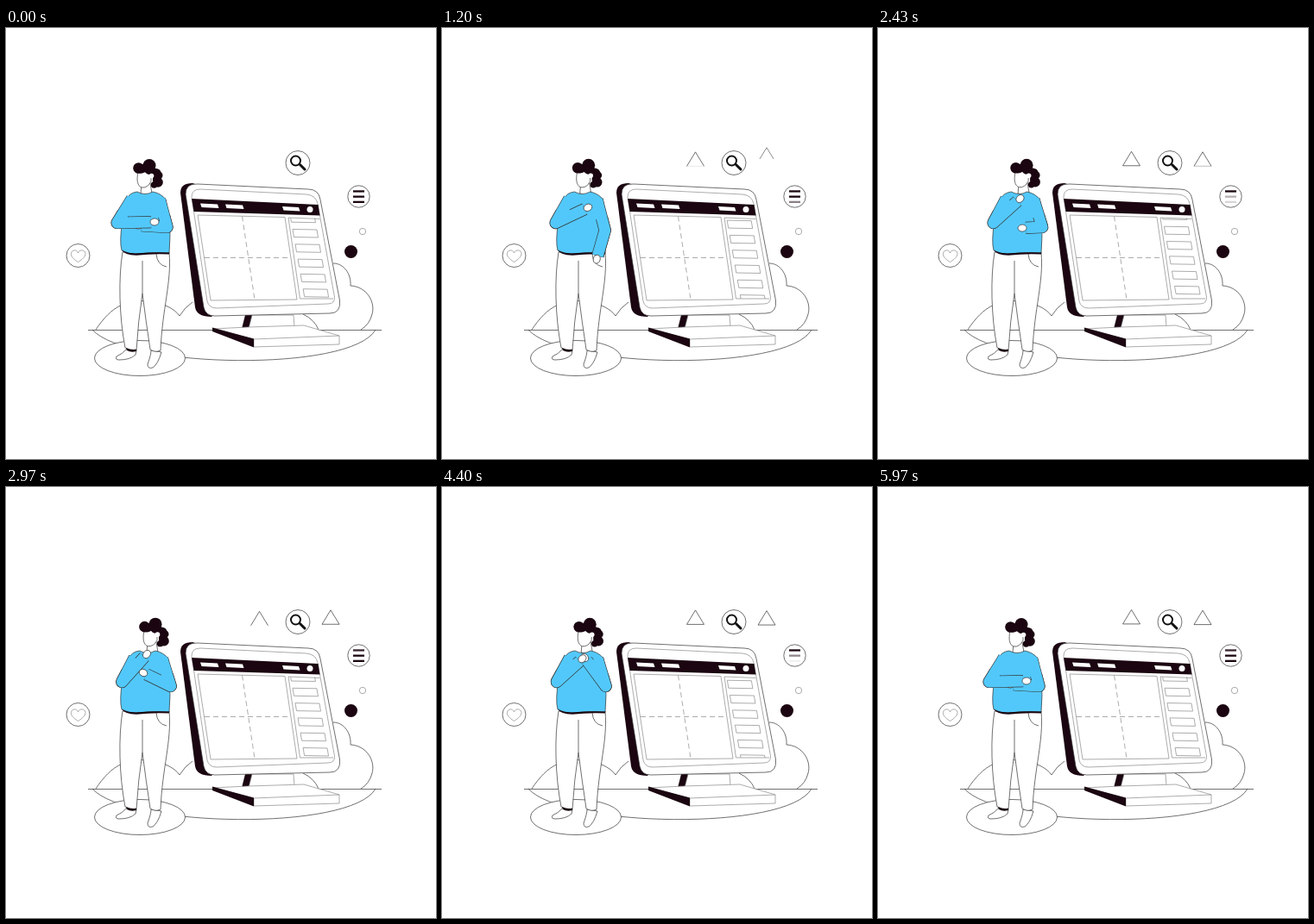
An HTML page that plays this animation: 498 px wide and 500 px high, repeating every 6010 ms.

```html
<!DOCTYPE html>
<html>
<head>
<meta charset="utf-8">
<style>
html, body { margin: 0; width: 100%; height: 100%; overflow: hidden; background: #fff; }
svg { display: block; width: 498px; height: 500px; }
.line { fill: none; stroke: #333; stroke-width: .7; }
.thin { stroke: #888; }
.white { fill: #fff; }
.dark { fill: #1a0510; }
.blue { fill: #52c8fa; }
.dash { stroke-dasharray: 6 4; }
.edge, .sleeve { fill: none; stroke: #333; stroke-width: 14.2; stroke-linejoin: round; }
.sleeve { stroke: #52c8fa; stroke-width: 12.9; }
</style>
</head>
<body>
<svg viewBox="0 0 498 500">
  <defs>
    <clipPath id="panel"><path d="M326 220.5H390V314H326Z"/></clipPath>
    <g id="arm"><path class="edge"/><path class="sleeve"/><ellipse class="line white" rx="5" ry="4"/></g>
  </defs>

  <!-- clouds and ground -->
  <g class="line">
    <path d="M104 350C112 338 122 326 135 321Q150 315 162 317C180 318 195 325 201 334Q207 324 216 318"/>
    <path d="M379 273C391 273 400 285 399 299C418 300 428 318 424 332Q421 344 411 350M344 332Q357 338 362 350"/>
    <path d="M100 350C140 395 400 400 428 350M95 350.5H435"/>
    <ellipse class="white" cx="155" cy="383" rx="52.5" ry="20.5"/>
  </g>

  <!-- monitor -->
  <path class="dark" d="M277 333H286L281 349H273Z"/>
  <path class="line white thin" d="M285 333H333L334 347L281 349Z"/>
  <path class="line white thin" d="M239 349L280 347L345 345L386 357V367L287 370V361Z"/>
  <path class="line thin" d="M287 361L386 357"/>
  <path class="dark" d="M239 347.5L287 360.5V370.5L239 352Z"/>
  <path class="dark" d="M216 180Q202 180 202 191L219 324Q221 335 238 335L250 320L222 182Z"/>
  <path class="line white" d="M222 181L350 187Q362 187 364 199L386.5 316Q388 331 375 331L242 334Q231 334 229 324L208 193Q208 180 222 181Z"/>
  <path class="line thin" d="M225 187L348 193Q359 194 361 204L380.5 312Q381 320 373 320L244 325Q235 325 233 317L215 196Q215 187 225 187Z"/>
  <path class="dark" d="M215 198L361.5 205L363.5 217.5L217.5 213Z"/>
  <path class="white" d="M225 203.5l20 1l1.5 4.5l-20 -1ZM254 204.5l20 1l1.5 4.5l-20 -1ZM320 207l19 1l1.5 4.5l-19 -1Z"/>
  <circle class="white" cx="352" cy="210.5" r="3.5"/>
  <g class="line thin">
    <path d="M222 217L323 219.5L337 315L237 316Z"/>
    <path class="dash" d="M273.5 218.5L288 315M230 266.5H330"/>
    <path d="M379 314H340.5L327 220L363.5 221.5"/>
  </g>
  <g clip-path="url(#panel)"><path id="items" class="line thin"/></g>

  <!-- floating icons -->
  <g class="line">
    <circle cx="83.5" cy="264" r="13.5"/>
    <path class="thin" d="M83.5 271.5C78 268 75 265 75.5 261.5C76 257 82 256.5 83.5 261C85 256.5 91.5 257 92 261.5C92 265 89 268 83.5 271.5Z"/>
    <circle cx="338" cy="156.5" r="14"/>
    <circle cx="408.5" cy="195.5" r="12.7"/>
    <circle class="thin" cx="413" cy="236" r="3.7"/>
  </g>
  <circle class="dark" cx="399.5" cy="259.5" r="7.5"/>
  <g fill="none" stroke="#111" stroke-linecap="round">
    <circle cx="335.5" cy="154" r="5.5" stroke-width="2"/>
    <path d="M340.5 158.5L346 164" stroke-width="3"/>
  </g>
  <path class="bar dark" d="M402 200.7h13v2.3h-13Z"/>
  <path class="bar dark" d="M402 194.5h13v2.3h-13Z"/>
  <path class="bar dark" d="M402 188.3h13v2.3h-13Z"/>
  <g class="line tri"><path d="M-10 16.5L0 0L10 16.5"/><path d="M-10 16.5H10"/></g>
  <g class="line tri"><path d="M-10 16.5L0 0L10 16.5"/><path d="M-10 16.5H10"/></g>

  <!-- legs -->
  <g class="line white">
    <path d="M139 373Q135 378 128 381Q126 385 131 385Q144 385 150 379L151 374Z"/>
    <path d="M168 374Q168 379 164 390Q164 396 170 394Q176 390 180 376Z"/>
    <path d="M135 260C130 290 131 335 138 371Q144 375 151 374Q153 340 158 308Q162 340 167 373Q173 377 179 374C181 325 192 295 189 260Z"/>
    <path d="M158 308V270M174 262Q175 275 186 277"/>
  </g>
  <path class="dark" d="M139 371Q145 374 151 372.5V375Q145 377 140 374Z"/>

  <!-- upper body -->
  <g id="head">
    <path class="line white" d="M157 181L156 192Q162 196 169 192L167 180Z"/>
    <path class="line white" d="M153 167C151 176 152 183 157 185Q164 186 168 178V167Z"/>
    <g class="dark">
      <circle cx="153.5" cy="162.5" r="6.3"/><circle cx="166" cy="159.5" r="7.5"/>
      <circle cx="174" cy="168.5" r="5.5"/><circle cx="177" cy="171" r="4.5"/>
      <circle cx="176" cy="179" r="5.8"/><circle cx="171.5" cy="182" r="3.7"/>
      <path d="M150 166Q156 171 161 167Q164 171 170 170V178H178L174 163L158 158Z"/>
    </g>
    <circle class="white" cx="168.5" cy="171.5" r="2.8"/>
  </g>
  <path class="edge under"/><path class="edge under"/>
  <path id="torso" class="line blue"/>
  <path class="dark" d="M134 257.5Q138 261 150 261.5Q172 259.5 189 260.5V262.5Q170 261.5 151 263.8Q137 263.5 134 257.5Z"/>
  <g class="arm"><path class="edge"/><path class="sleeve"/><ellipse class="line white" rx="5" ry="4"/></g>
  <g class="arm"><path class="edge"/><path class="sleeve"/><ellipse class="line white" rx="5" ry="4"/></g>
</svg>
<script>
const LOOP = 6010;
const $ = s => document.querySelector(s), all = s => [...document.querySelectorAll(s)];
const clamp = v => Math.min(1, Math.max(0, v));
const smooth = v => (v = clamp(v), v * v * (3 - 2 * v));
const mix = (a, b, k) => a + (b - a) * k;

// how far the body leans, and where each hand is
const pose = (lean, nearX, nearY, farX, farY) => [lean, nearX, nearY, farX, farY];
const crossed = pose(0, 153, 229, 172, 225);
const moves = [
  [0, crossed],
  [530, pose(3, 164.5, 262, 171, 210)],      // arm swings down
  [1870, pose(4, 186, 271, 168, 207.5)],     // arm hangs
  [2970, pose(7, 159, 215.5, 163, 194)],     // hand on chin
  [3730, pose(3.5, 167, 202, 164.5, 203)],   // hands clasped
  [5070, pose(6, 164.5, 196, 161.5, 197.5)], // hands raised
  [5970, crossed], [LOOP, crossed]
];

function poseAt(t) {
  const i = moves.findIndex(([at]) => at > t);
  const [[start, from], [end, to]] = [moves[i - 1], moves[i]];
  const k = smooth((t - start) / (end - start) / .8);
  return from.map((v, j) => mix(v, to[j], k));
}

function drawArm(i, shoulder, elbow, hand) {
  const [[sx, sy], [ex, ey], [hx, hy]] = [shoulder, elbow, hand];
  const angle = Math.atan2(hy - ey, hx - ex);
  const fore = `L${ex} ${ey}L${hx - 4 * Math.cos(angle)} ${hy - 4 * Math.sin(angle)}`;
  const whole = `M${sx} ${sy}${fore}`;
  const [edge, sleeve, palm] = all('.arm')[i].children;
  all('.under')[i].setAttribute('d', whole);
  edge.setAttribute('d', `M${mix(sx, ex, .6)} ${mix(sy, ey, .6)}${fore}`);
  sleeve.setAttribute('d', whole);
  palm.setAttribute('transform', `translate(${hx} ${hy}) rotate(${angle * 180 / Math.PI})`);
}

function drawPerson(t) {
  const [lean, nearX, nearY, farX, farY] = poseAt(t), s = lean * .4;
  $('#head').setAttribute('transform', `translate(${lean} ${-lean * .05})`);
  $('#torso').setAttribute('d', `M${152 + s} 190Q${143 + s} 191 ${140 + s} 198L135 222Q131 248 134 258
    Q142 263 152 262Q170 260 189 261Q191 240 189 222L${185 + s} 199Q${180 + s} 192 ${170 + s} 190
    Q${161 + s} 195 ${152 + s} 190Z`);
  const drop = Math.max(0, nearY - 250) * .2;
  drawArm(0, [178 + s, 199], [186.5 + lean * .6, 231 + drop], [nearX, nearY]);
  drawArm(1, [146 + s, 198], [128.7 + lean * .8, 226], [farX, farY]);
}

function drawItems(t) {
  const shift = t * 2 / LOOP % 1;
  let d = '';
  for (let i = -2; i < 6; i++) {
    const step = (i + shift) * 17.3;
    d += `M${332 + step * .175} ${233.5 + step}l28 .5l1.5 9l-28 -.5Z`;
  }
  $('#items').setAttribute('d', d);
}

// drops in while growing, then bobs; the base fades at the low point
function drawTriangle(tri, t, x, start, period, low) {
  const p = smooth((t - start) / 560);
  const bob = Math.cos((t - low) / period * 2 * Math.PI);
  tri.setAttribute('transform', `translate(${x} ${mix(119, 143.3 + bob, p)}) scale(${p})`);
  tri.style.display = p > 0 ? '' : 'none';
  tri.lastElementChild.style.opacity = p < 1 ? 0 : clamp((.6 - bob) * 3);
}

// the bars dip one after another, from the bottom up
function drawBars(t) {
  const phase = t * 6 / LOOP % 1;
  all('.bar').forEach((bar, i) => {
    bar.style.opacity = smooth(Math.abs(phase - .35 - .19 * i) / .3);
  });
}

function draw(t) {
  const [left, right] = all('.tri');
  drawPerson(t);
  drawItems(t);
  drawTriangle(left, t, 293.5, 250, 2100, 870);
  drawTriangle(right, t, 376, 800, 3200, 1870);
  drawBars(t);
}

const began = performance.now();
(function frame() {
  draw((performance.now() - began) % LOOP);
  requestAnimationFrame(frame);
})();
</script>
</body>
</html>
```
